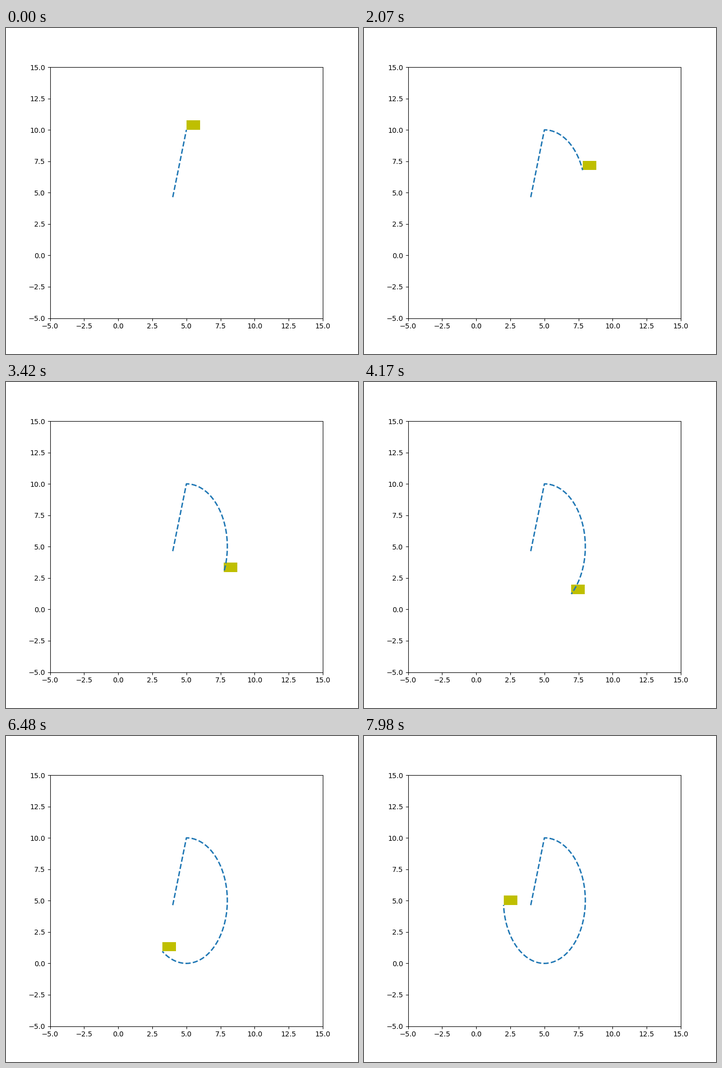
A matplotlib script for the animation above (8 s loop, 700 px wide and 650 px high).

```python
import matplotlib.pyplot as plt
import numpy as np
from matplotlib.animation import FuncAnimation
from matplotlib.patches import Rectangle

LOOP_MS = 8000
TICK_MS = 20
STEP_MS = 30          # the angle grows one degree per step
START = (4, 4.64)     # the trail begins here, off the ellipse

fig = plt.figure(figsize=(7, 6.5), dpi=100)
ax = fig.add_subplot(xlim=(-5, 15), ylim=(-5, 15))

box = Rectangle((5, 10), 1, 0.75, fc="y")
ax.add_patch(box)
trail, = ax.plot([], [], "--", lw=2)


def ellipse(deg):
    a = np.radians(deg)
    return 5 + 3 * np.sin(a), 5 + 5 * np.cos(a)


def update(i):
    deg = (i * TICK_MS + TICK_MS // 2) // STEP_MS
    x, y = ellipse(np.arange(deg + 1))
    trail.set_data(np.r_[START[0], x], np.r_[START[1], y])
    box.set_xy((x[-1], y[-1]))
    return box, trail


def init():
    return update(0)


anim = FuncAnimation(fig, update, init_func=init, frames=LOOP_MS // TICK_MS,
                     interval=TICK_MS, repeat=True, repeat_delay=0, blit=False)
plt.show()
```
